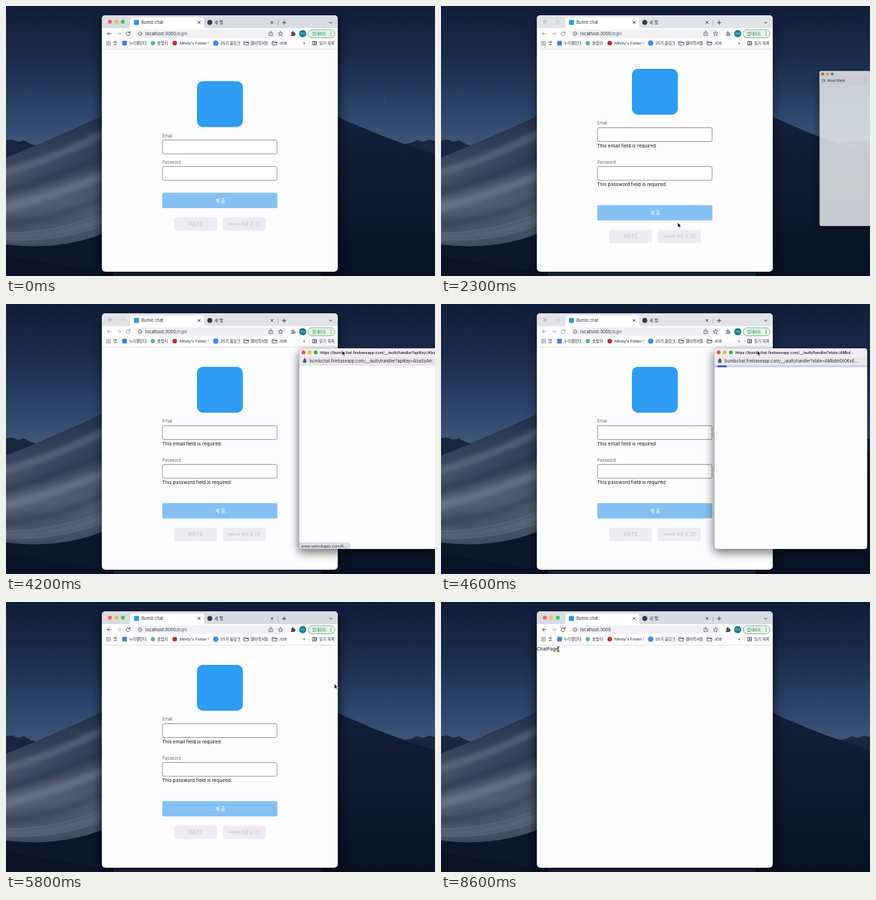
An HTML page that plays this animation: 600x378 px, repeating every 8700 ms.

```html
<!DOCTYPE html>
<html lang="ko">
<head>
<meta charset="utf-8">
<style>
  html, body { margin: 0; width: 100%; height: 100%; overflow: hidden; background: #0b1629; }
  svg { display: block; width: 600px; height: 378px; }
  text { font: 5.4px Inter, "Noto Sans CJK KR", "Noto Sans CJK", sans-serif; fill: #2b2d31; white-space: pre; }
  .url { font-size: 5.75px; }
  .msg { font-size: 6.6px; fill: #111; }
  .label { font-size: 5.7px; font-weight: 300; fill: #444; }
  .mid { text-anchor: middle; }
  .line { fill: none; stroke: #50545a; stroke-width: .9; stroke-linecap: round; stroke-linejoin: round; }
  .field { fill: #fff; stroke: #7b7b80; stroke-width: .8; }
  .soft { fill: #ededef; }
  .dim { fill: #b9b9bd; }
</style>
</head>
<body>
<svg viewBox="0 0 600 378">
  <defs>
    <linearGradient id="sky" x2="0" y2="1">
      <stop stop-color="#101d39"/><stop offset=".2" stop-color="#1a2d4d"/>
      <stop offset=".4" stop-color="#2d466c"/><stop offset=".53" stop-color="#43597b"/>
    </linearGradient>
    <linearGradient id="lit" x2="0" y2="1">
      <stop stop-color="#222f49"/><stop offset=".3" stop-color="#35425b"/>
      <stop offset=".65" stop-color="#505c72"/><stop offset="1" stop-color="#3b475d"/>
    </linearGradient>
    <linearGradient id="shade" x2="0" y2="1">
      <stop stop-color="#13213b"/><stop offset=".5" stop-color="#0d192f"/><stop offset="1" stop-color="#081225"/>
    </linearGradient>
    <filter id="blur" x="-30%" y="-30%" width="160%" height="160%"><feGaussianBlur stdDeviation="4"/></filter>
    <filter id="shadow" x="-30%" y="-30%" width="160%" height="160%"><feGaussianBlur stdDeviation="7"/></filter>
    <clipPath id="dune"><path d="M0 212Q70 185 150 147V312Q85 344 0 334Z"/></clipPath>
    <clipPath id="frame"><rect x="134" y="13" width="330" height="359" rx="5"/></clipPath>
    <clipPath id="popFrame"><rect width="214" height="281" rx="4"/></clipPath>
  </defs>

  <!-- desert night -->
  <rect width="600" height="378" fill="url(#sky)"/>
  <g id="stars" fill="#9fb3d2"></g>
  <path d="M0 188L9 187L17 190L25 188L36 194L60 198V220H0ZM545 194L566 192L574 188L583 190L592 187L600 189V220H545Z" fill="#18263f"/>
  <path d="M0 212Q70 185 150 147V378H0Z" fill="#0c172c"/>
  <g clip-path="url(#dune)">
    <rect y="147" width="150" height="200" fill="url(#lit)"/>
    <g fill="none" stroke="#7f8a9f" filter="url(#blur)">
      <path d="M-10 236Q70 214 150 172" stroke-width="7" opacity=".65"/>
      <path d="M-10 263Q70 240 150 206" stroke="#1f2c45" stroke-width="9" opacity=".6"/>
      <path d="M-10 285Q60 268 150 232" stroke-width="10" opacity=".6"/>
      <path d="M-10 306Q70 302 150 262" stroke="#263349" stroke-width="7" opacity=".6"/>
      <path d="M-10 323Q75 326 150 294" stroke-width="6" opacity=".6"/>
    </g>
    <path d="M0 327Q75 332 150 301M0 318Q75 318 150 285" class="line" style="stroke:#8791a4;opacity:.35"/>
  </g>
  <path d="M440 144Q520 183 600 207V378H440Z" fill="url(#shade)"/>
  <path d="M134 372H600V378H0V350Z" fill="#071023" opacity=".6"/>

  <!-- main window -->
  <rect id="mainShadow" x="132" y="19" width="334" height="358" rx="6" filter="url(#shadow)"/>
  <g clip-path="url(#frame)">
    <rect x="134" y="13" width="330" height="359" fill="#fdfcfe"/>
    <rect id="strip" x="134" y="13" width="330" height="18" fill="#d8dce2"/>
    <path d="M171 31Q174 31 174 28V19Q174 16 177 16H274Q277 16 277 19V28Q277 31 280 31Z" fill="#fff"/>
    <g id="lights"><circle cx="145.300" cy="22" r="2.700" fill="#f15b52"/><circle cx="154.300" cy="22" r="2.700" fill="#f4bb35"/><circle cx="163.300" cy="22" r="2.700" fill="#35c148"/></g>
    <rect x="179" y="19.500" width="7" height="7" rx="1" fill="#2d96e9"/>
    <text x="189.300" y="25.400" class="url">Bumlo chat</text>
    <circle cx="285" cy="23" r="3.500" fill="#2f3a4c"/>
    <text x="291.500" y="25.400" class="url">새 탭</text>
    <path class="line" style="stroke:#33363b" d="M268.500 21.500l3 3m0-3l-3 3M370.500 21.500l3 3m0-3l-3 3M386.500 23.300h5m-2.500-2.500v5M452.200 22.300l2 2l2-2"/>
    <path d="M380.500 19.500v8" stroke="#9ca0a7" stroke-width=".7"/>

    <rect x="181" y="33" width="210" height="11.500" rx="5.700" fill="#eff0f3"/>
    <g id="tools">
      <path class="line" d="M147 38.700h-5m2.300-2.500l-2.500 2.500l2.500 2.500M173 37.200a2.700 2.700 0 1 0 .5 2.200M173.500 35.500v2.200h-2.200"/>
      <path d="M398.500 37h1.600q-.3-1.900 1-1.900t1 1.900h1.700v1.600q1.500-.2 1.500 1t-1.500 1V42h-5.300v-1.700q1.400-.3 1.200-1t-1.200-.8Z" fill="#474a50"/>
    </g>
    <path class="line" style="stroke:#b5b7bb" d="M155.500 38.700h5m-2.300-2.500l2.500 2.500l-2.500 2.500"/>
    <path class="line" style="stroke-width:.7" d="M368.800 37.500h-1v4h5v-4h-1M370.300 39.500v-4.300m-1.300 1.200l1.300-1.300l1.300 1.300M384 35.700l.9 2l2.200.2l-1.700 1.400l.6 2.200l-2-1.200l-2 1.200l.6-2.200l-1.700-1.400l2.200-.2Z"/>
    <circle cx="187.500" cy="38.700" r="2.500" class="line" style="stroke-width:.7"/>
    <path d="M187.500 38.400v1.700m0-3v.5" stroke="#50545a" stroke-width=".7"/>
    <text x="195" y="40.900" style="font-size:6px">localhost:3000<tspan id="path" fill="#666">/login</tspan></text>
    <circle cx="415" cy="38.700" r="5" fill="#147d8e"/>
    <text x="415" y="40.200" class="mid" style="font-size:3.800px;fill:#d7eff2">미소</text>
    <rect x="422.500" y="33.200" width="37.500" height="11.300" rx="5.600" fill="#e7f4ea" stroke="#67a77b" stroke-width=".8"/>
    <text x="428" y="40.800" style="fill:#187a3c;font-weight:500">업데이트</text>
    <path d="M454.500 36.200v.1m0 2.400v.1m0 2.400v.1" class="line" style="stroke:#187a3c;stroke-width:1.200"/>

    <g fill="#5d6167" id="apps"></g>
    <rect x="162.500" y="48.700" width="6.500" height="6.500" rx="1" fill="#3e7fe5"/>
    <circle cx="205.300" cy="52" r="3" fill="#54b77c"/>
    <circle cx="236" cy="52" r="3.200" fill="#bd302a"/>
    <circle cx="293.300" cy="52" r="3.700" fill="#3c8bed"/>
    <path class="line" style="stroke-width:.8" d="M333 49.500h2.500l.8 1h3v4h-6.300ZM333 51.500h6.300M372.500 49.500h2.500l.8 1h3v4h-6.300ZM372.500 51.500h6.300M429 49.500h5.500v5h-5.500ZM431 49.500v5m0-3.400h3.500m-3.500 1.700h3.500"/>
    <text y="54"><tspan x="150">앱</tspan><tspan x="172">누리캘린더</tspan><tspan x="211.500">솔빛터</tspan><tspan x="243">Mindy's Folder !</tspan><tspan x="300">25기 봄링크</tspan><tspan x="342">웹이력서들</tspan><tspan x="382">JOB</tspan><tspan x="415.500">»</tspan><tspan x="438">읽기 목록</tspan></text>
    <path d="M134 60.300H464M424.500 48.500v7" stroke="#dadbdf" stroke-width=".8"/>

    <g id="login">
      <g id="upper">
        <rect x="267" y="105.300" width="64.300" height="64.300" rx="8.500" fill="#2e9cf0"/>
        <text x="218.500" y="183.600" class="label">Email</text>
        <rect x="218.900" y="187.700" width="160.200" height="19.300" rx="2" class="field"/>
      </g>
      <text x="218.500" y="220.700" class="label">Password</text>
      <rect x="218.900" y="224.700" width="160.200" height="19.300" rx="2" class="field"/>
      <g id="errors">
        <text x="218.500" y="197.600" class="msg">This email field is required</text>
        <text x="218.500" y="252" class="msg">This password field is required</text>
      </g>
      <g id="lower">
        <rect x="218.500" y="261.500" width="161" height="21.500" rx="2" fill="#84c0f4"/>
        <text x="299.700" y="274.600" class="mid" style="font-size:6.600px;fill:#fff">제 출</text>
        <rect x="235" y="296" width="60" height="18.500" rx="1" class="soft"/>
        <rect x="303.500" y="296" width="60" height="18.500" rx="1" class="soft"/>
        <text x="265" y="307.300" class="mid dim">회원가입</text>
        <text x="333.500" y="307.300" class="mid dim">velnok ID로 로그인</text>
      </g>
    </g>
    <text id="chat" x="134" y="68" class="msg" style="font-size:6.500px">ChatPage</text>
  </g>

  <!-- sign-in popup -->
  <g id="popup">
    <rect x="-1" y="5" width="216" height="281" rx="5" opacity=".55" filter="url(#shadow)"/>
    <g clip-path="url(#popFrame)">
      <rect id="popBody" width="214" height="281" fill="#fdfcfe"/>
      <rect width="214" height="11.500" fill="#f2edf2"/>
      <rect y="11.500" width="214" height="12" fill="#e9e7ec"/>
      <path d="M0 23.700H214" stroke="#d2d1d6" stroke-width=".6"/>
      <circle cx="6" cy="5.700" r="2.600" fill="#ec5049"/><circle cx="14.600" cy="5.700" r="2.600" fill="#f1b52f"/><circle cx="23.200" cy="5.700" r="2.600" fill="#2fae43"/>
      <text id="popTitle" x="29.500" y="7.700" style="font-size:5.100px;font-weight:600"></text>
      <path id="lock" d="M5.800 16.500h4v3.500h-4ZM6.600 16.500v-1a1.200 1.200 0 0 1 2.400 0v1" fill="#505359" stroke="#505359" stroke-width=".5"/>
      <circle id="info" cx="7.500" cy="17.500" r="2.300" class="line"/>
      <text id="popUrl" x="14.500" y="19.800" class="url"></text>
      <g id="loader">
        <rect y="24" width="214" height="2.500" fill="#c9cfee"/>
        <rect id="bar" y="24" height="2.500" fill="#3f51b5"/>
      </g>
      <g id="status">
        <path d="M0 272.500H69.500Q71 272.500 71 274V281H0Z" fill="#dcdde2" stroke="#b9bbc1" stroke-width=".5"/>
        <text x="2.500" y="278.700">www.velnokapis.com/6...</text>
      </g>
    </g>
    <rect width="214" height="281" rx="4" fill="none" stroke="#777b85" stroke-opacity=".5" stroke-width=".5"/>
  </g>

  <g id="cursor">
    <path id="arrow" d="M0 0V7.200L1.700 5.700L2.900 8.300L4.100 7.800L3 5.300H5.200Z" fill="#111" stroke="#fff" stroke-width=".7"/>
    <path id="beam" class="line" style="stroke:#222" d="M-1.500-3.500Q0-3.500 0-2.500V2.500Q0 3.500-1.500 3.500M1.500-3.500Q0-3.500 0-2.500M0 2.500Q0 3.500 1.500 3.500"/>
  </g>
</svg>
<script>
const LOOP = 8700, STEP = 100;
const $ = id => document.getElementById(id);
const set = (id, name, value) => $(id).setAttribute(name, value);
const show = (id, on) => set(id, 'visibility', on ? 'inherit' : 'hidden');
const clamp = v => Math.max(0, Math.min(1, v));
const ease = v => v * v * (3 - 2 * v);

// Each key is [time, x, y]; motion between keys is eased.
function along(keys, t) {
  const i = keys.findIndex(k => k[0] > t);
  if (i < 0) return keys[keys.length - 1].slice(1);
  if (i === 0) return keys[0].slice(1);
  const [a, b] = [keys[i - 1], keys[i]];
  const k = ease((t - a[0]) / (b[0] - a[0]));
  return [a[1] + (b[1] - a[1]) * k, a[2] + (b[2] - a[2]) * k];
}

const pointerKeys = [
  [400, 538, 300], [900, 300, 272], [1100, 300, 272], [1700, 328, 302],
  [1900, 331, 316], [2200, 331, 303], [2700, 331, 303], [3400, 564.5, 61.5]
];
const popupKeys = [[3600, 505, 59], [4200, 410, 62], [4700, 379, 62]];
const leaveKeys = [[5200, 439, 65], [6300, 474.5, 152], [6900, 474.5, 152], [8100, 164, 66]];

const host = 'bumlochat.firebaseapp.com/__/auth/handler?';
const pages = [
  { from: 0, title: '', url: 'about:blank' },
  { from: 2900, title: 'apiKey=AIzaSyAm', url: 'apiKey=AIzaSyAm' },
  { from: 4500, title: 'state=AMbd...', url: 'state=AMbdmDIO6s6...' }
];

let seed = 7;
const random = () => (seed = seed * 16807 % 2147483647) / 2147483647;
let dots = '';
for (let i = 0; i < 50; i++)
  dots += `<circle cx="${random() * 600}" cy="${random() * 150}" r="${.2 + random() * .3}" opacity=".5"/>`;
$('stars').innerHTML = dots;
$('apps').innerHTML = [...Array(9).keys()]
  .map(i => `<rect x="${140.5 + i % 3 * 2.2}" y="${49.3 + (i / 3 | 0) * 2.2}" width="1.3" height="1.3"/>`).join('');

function drawPopup(t) {
  const open = t >= 2200 && t < 5600;
  show('popup', open);
  if (!open) return;
  const [x, y] = along(popupKeys, t);
  const k = clamp((t - 2200) / 300), scale = .66 + .34 * k;
  set('popup', 'transform', `translate(${x + 107} ${y + 140.5}) scale(${scale}) translate(-107 -140.5)`);
  set('popup', 'opacity', .75 + .25 * k);
  const page = pages.filter(p => t >= p.from).pop(), blank = !page.title;
  set('popBody', 'fill', blank ? '#eeeeef' : '#fdfcfe');
  $('popTitle').textContent = blank ? '' : 'https://' + host + page.title;
  $('popUrl').textContent = blank ? page.url : host + page.url;
  show('lock', !blank);
  show('info', blank);
  show('status', t >= 4000 && t < 4500);

  const start = t < 4000 ? 2950 : 4520;
  show('loader', t >= start && (t < 3900 || t >= 4500));
  const p = Math.max(0, t - start) % 2000 / 2000;
  const left = p < .5 ? p / 2 : Math.min(1, .25 + (p - .5) * 3);
  const right = Math.min(1, p * 2);
  set('bar', 'x', left * 214);
  set('bar', 'width', Math.max(0, right - left) * 214);
}

function drawCursor(t) {
  let [x, y] = along(pointerKeys, t);
  if (t >= 3600) {
    const [px, py] = along(popupKeys, t);
    [x, y] = [px + 60, py + 3];
  }
  if (t >= 5200) [x, y] = along(leaveKeys, t);
  const overText = t > 6500 && x < 167;
  show('cursor', t >= 400);
  show('arrow', !overText);
  show('beam', overText);
  set('cursor', 'transform', `translate(${x} ${y})`);
}

function draw(t) {
  const focused = t < 2100 || t >= 5700;
  const failed = t >= 1100, done = t >= 6000;
  set('mainShadow', 'opacity', focused ? .65 : .4);
  set('strip', 'fill', focused ? '#d8dce2' : '#e1e3e8');
  set('tools', 'opacity', focused ? 1 : .55);
  set('lights', 'style', focused ? '' : 'filter:grayscale(1) brightness(1.25) opacity(.35)');
  show('login', !done);
  show('chat', done);
  show('path', !done);
  show('errors', failed);
  set('upper', 'transform', `translate(0 ${failed ? -17.3 : 0})`);
  set('lower', 'transform', `translate(0 ${failed ? 17.2 : 0})`);
  drawPopup(t);
  drawCursor(t);
}

function tick() {
  draw(Math.floor(performance.now() % LOOP / STEP) * STEP);
  requestAnimationFrame(tick);
}
tick();
</script>
</body>
</html>
```
